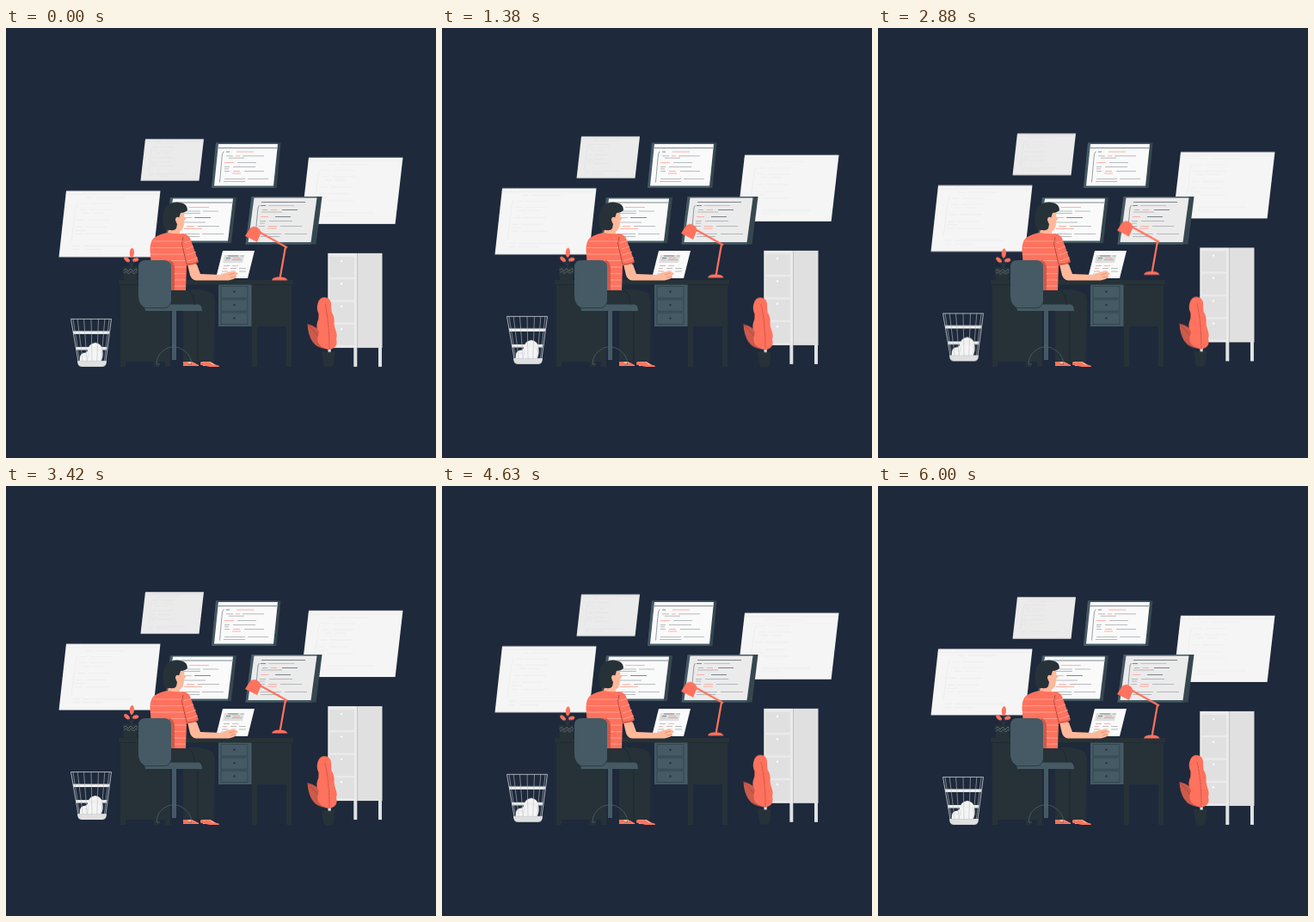
Write an HTML page that moves like this. It is 500x500 px and loops after 6.04 s.

```html
<!DOCTYPE html>
<html lang="en">
<head>
<meta charset="utf-8">
<title>Night desk</title>
<style>
  html, body { margin: 0; width: 100%; height: 100%; overflow: hidden; background: #1e293b; }
  svg { display: block; width: 100vw; height: 100vh; }
  .dark { fill: #263238; }
  .slate { fill: #455a64; }
  .red { fill: #ff725e; }
  .skin { fill: #ffb89a; }
  .pale { fill: #e0e0e0; }
  .line { fill: none; stroke-width: .7; }
</style>
</head>
<body>
<svg viewBox="0 0 500 500">
  <g class="float" id="windows"></g>
  <g id="monitors"></g>

  <g class="float" id="cabinet">
    <path fill="#dfe2e4" d="M404.300 371h4v23h-4zM433 371h4v23h-4z"/>
    <path class="pale" d="M374.500 262h63v110h-63z"/>
    <path fill="#ebebeb" d="M374.500 262h33.500v110h-33.500z"/>
    <path class="line" stroke="#b5b5b5" d="M408.500 262v110"/>
  </g>

  <g class="float" id="basket">
    <path fill="#f5f5f5" d="M86 387q-1-8 4-9q4 0 5-3q1-8 9-9q7 1 8 8q2 8-2 14h-23z"/>
    <path class="line" stroke="#dcdcdc" d="M96 376q1 5-2 11M105 371q5 2 6 8M90 381l6 1"/>
    <path fill="#f0f0f0" d="M77.800 352.500h42.500l-.6 3.500h-41.300zM81 371h36.500l-.6 3.500h-35.300z"/>
    <path class="pale" d="M83 387h34q0 7-5 7h-24q-5 0-5-7z"/>
  </g>

  <g class="sway" id="floorPlant">
    <path class="dark" d="M367 376h15.500l-1.500 15q-1 3-3 3h-6q-2 0-3-3z"/>
    <path fill="#ebebeb" d="M374.500 371h3.200v5.500h-3.200z"/>
    <path fill="#cc5b4b" d="M350.500 344q13 3 17.500 13q3 7 4 16q-11-1-16-9q-5-8-5.500-20z"/>
    <path class="line" stroke="#9f4438" d="M351 345q13 12 21 28"/>
    <path class="red" d="M370 313q7 0 8 7q0 5 .5 10q4 6 3 13q0 4 2 9q2 5 .5 9q2 8-3 11q-5 3-9 1q-8-3-9.500-9q-1-5 1.500-10q-4-6-2-12q2-4 1.500-10q-3-6-1-12q2-7 7.500-7z"/>
    <path class="line" stroke="#a8483c" stroke-dasharray="2 .7" d="M371 321q5 21 5 53"/>
  </g>

  <g class="swayBack">
    <g class="red">
      <ellipse cx="146.400" cy="261.500" rx="2.600" ry="5.600" transform="rotate(4 146 261)"/>
      <ellipse cx="140.600" cy="269.300" rx="4" ry="2.200" transform="rotate(42 140.600 269.300)"/>
      <ellipse cx="150.700" cy="269.700" rx="3.700" ry="2.200" transform="rotate(-14 150.700 269.700)"/>
    </g>
    <path class="line" stroke="#37474f" d="M146 267v11M142 272l4 5l4-6"/>
    <path class="dark" d="M135.500 277.500h18l-1.500 17h-15z"/>
    <path class="line" stroke="#78868c" d="M136.500 282l2.500-2l3 3l3-3l3 3l3-3l2 2M137 285l2.500-2l3 3l3-3l3 3l3-3l1 1.500"/>
  </g>

  <g id="desk">
    <path class="dark" d="M131 293h203v6h-203zM133 298h58v90h-58zM133 387h6v7h-6zM172 387h6v7h-6zM185 387h6v7h-6zM285 298h47v49h-47zM286 346h6v48h-6zM326 346h6v48h-6z"/>
    <path class="line" stroke="#1f2a30" d="M131 298.500h203"/>
    <path class="slate" d="M247 298.500h38.500v48.500h-38.500z"/>
  </g>

  <g id="laptop"></g>

  <g id="person">
    <path class="skin" d="M207 387h7l10 5v1h-16zM227 387h9l10 6h-17z"/>
    <path class="red" d="M206 388h5l2 3l6-2l5 4h-18zM226 388.500h11l3 3l6 .5q2 .5 2 2h-11l-11-2.500z"/>
    <path class="dark" d="M178 304h38q18 0 24 5q3 4 3 11l-1 68h-36v-60h-28z"/>
    <path class="line" stroke="#17212a" d="M223 330v57M210 304q9 4 9 18"/>
    <path class="skin" d="M192 226l10 6v9q-6 4-15 0z"/>
    <path class="skin" d="M196 209h11q0 8 .5 12l2 0-2.500 4q0 9-4 11q-6 1-9-6z"/>
    <path class="dark" d="M184 234q-3-9-1-18q1-9 8-12q8-3 15 0q5 2 5 8q-3 3-8 3l-2 6q-4-2-4 2q1 4 2 5l-1 5q-2 3-7 2q-4 0-7-1z"/>
    <ellipse class="skin" cx="199.500" cy="222.500" rx="2" ry="2.800"/>
    <path class="skin" d="M210 270l12 5l4 11l25 1q7-4 12-4q5 0 7 3l-3 2l1 2q-4 3-9 3.500h-38q-5-.5-7-6z"/>
    <path class="line" stroke="#e4896d" d="M259 287l7-2M261 290l7-1"/>
    <path class="red" d="M172 244q8-5 16-6q9 2 18 1q7 1 9 8l9 25q-5 4-14 4l-1 29h-38l-3-40q-2-16 4-21z"/>
    <path fill="#cc5b4b" d="M190 270q6 2 6 9v26h-6z"/>
    <g class="line" stroke="#ffb5a8">
      <path d="M171 248h35M169 255.500h38M168 263h39M192 270.500h17M196 278h13M196 285.500h13M196 293h13M196 300h13"/>
      <path d="M207 249.500l8-2M209 257l9-3M210 264l11-3.500M211 271l12-4"/>
    </g>
    <path class="line" stroke="#8d3f36" d="M206 243q-3 8 0 14l4 18l8-1l6-3"/>
  </g>

  <g id="chair">
    <path class="slate" d="M193 328h5v58h-5z"/>
    <path class="line" stroke="#53666f" d="M175 391q0-13 13-19q7-3 14 0q13 6 14 19M175 391h4M212 391h4"/>
    <path class="slate" d="M162 321.500h62q4 1 4 7.500h-66q-1-3 0-7.500z"/>
    <path class="slate" d="M162 270h22q8 0 8 8v40q0 7-7 8h-18q-13-1-13-15v-33q0-8 8-8z"/>
    <path class="line" stroke="#263238" d="M162 325.500h23q6-1 6.500-7M192 306q14-1 21 5q6 5 6 11"/>
  </g>

  <g class="float" id="lamp">
    <path fill="none" stroke="#ff725e" stroke-width="2.200" d="M293 236.500l34 19M325.200 253.500l-6.700 38"/>
    <path class="red" d="M278 242l5-8q3-4 8-2.500q5 2 5.500 7l-4.500 10.500z"/>
    <path class="red" d="M309 293.500q1-4 9-4q8 0 9.500 4z"/>
  </g>
</svg>

<script>
const NS = 'http://www.w3.org/2000/svg';
const LOOP = 6040, LIFT = 6.9, SWAY = 1.5;
const INK = { d: '#56636b', g: '#a2a7aa', r: '#ff9a8a' };
const $ = id => document.getElementById(id);

function add(parent, tag, attrs) {
  const node = document.createElementNS(NS, tag);
  for (const key in attrs) node.setAttribute(key, attrs[key]);
  return parent.appendChild(node);
}

// Parallelogram: top-left corner, width, height, leftward slant.
function slab(parent, x, y, w, h, slant, fill) {
  add(parent, 'path', { fill, d: `M${x} ${y}h${w}l${-slant} ${h}h${-w}z` });
}

function stroke(parent, d, color, width = .8) {
  add(parent, 'path', { d, fill: 'none', stroke: color, 'stroke-width': width });
}

// Each row is "y ink:from-to ink:from-to ...".
function code(parent, rows) {
  for (const row of rows.split('\n')) {
    const [y, ...runs] = row.trim().split(' ');
    for (const run of runs) {
      const [ink, span] = run.split(':');
      const [from, to] = span.split('-');
      stroke(parent, `M${from} ${y}H${to}`, INK[ink], .75);
    }
  }
}

function faintWindow(x, y, w, h, slant, fill, ink) {
  const g = $('windows'), k = h / 77;
  const at = dy => x - slant * dy / h;
  slab(g, x, y, w, h, slant, fill);
  stroke(g, `M${at(4 * k)} ${y + 4 * k}h${w}`, ink, .5);
  for (let i = 0; i < 3; i++)
    add(g, 'circle', { cx: x + (7 + i * 5) * k, cy: y + 2.2 * k, r: .8 * k, fill: '#fff' });
  stroke(g, `M${x + 14 * k} ${y + 14 * k}q${-3 * k} 2 ${-4 * k} ${15 * k}l${-4 * k} ${30 * k}`, ink, .5);
  const rows = [[8, 24, 70], [15, 18, 55], [22, 18, 56], [26, 22, 46], [34, 17, 55],
                [42, 16, 52], [46, 16, 24], [50, 16, 58], [64, 15, 84], [68, 15, 50]];
  for (const [dy, from, to] of rows) {
    const left = at(dy * k) + from * w / 110;
    stroke(g, `M${left} ${y + dy * k}h${8 * k}m${4 * k} 0H${left + (to - from) * w / 110}`, ink, .5);
  }
}

function monitor(x, y, w, h, slant, screen, side, rows) {
  const g = $('monitors');
  slab(g, x, y, w, h, slant, '#37474f');
  slab(g, x, y, w - side, h, slant, '#455a64');
  slab(g, x + 3, y + 1.5, w - side - 3, h - 4, slant, screen);
  stroke(g, `M${x + 9} ${y + 10}q-2 2-2 8l-2.500 28`, INK.d, .6);
  code(g, rows);
}

faintWindow(162, 129.2, 68, 48.5, 5.5, '#ebebeb', '#dedede');
faintWindow(70, 189.4, 109.5, 77.2, 8.5, '#f5f5f5', '#e6e6e6');
faintWindow(352, 150.8, 109.5, 77.2, 8.9, '#f5f5f5', '#e6e6e6');

monitor(244, 133.5, 75.5, 52.5, 5, '#fafafa', 3.5, `139.5 d:247-315
  144 d:256-260 r:268-288
  148.8 g:256-264 r:267-272 g:275-300
  151.2 g:259-277
  156.5 r:254-265 g:269-291
  161.5 g:254-260 g:264-290
  163.8 g:254-259
  166.5 g:254-260 r:264-272 g:277-300
  169 r:263-273
  175.5 g:254-278 g:281-305
  178.5 g:253-278`);

monitor(191, 197, 77, 53, 6, '#fafafa', 4, `203 d:194-263
  208.5 r:213-236
  213 g:205-226 g:229-247
  215.5 g:206-226
  220.5 r:206-216 d:219-238
  226 g:205-232
  230.5 r:210-219 g:223-248
  233.5 r:207-228
  239.5 g:205-225 g:228-253
  242.5 g:203-225`);

monitor(285.5, 196, 82, 55.5, 7, '#ebebeb', 6, `202.5 d:297-348
  206.5 d:296-302 r:305-335
  211.5 g:298-304 r:308-315 d:321-339
  214 g:297-321
  219.5 r:296-305 d:313-331
  224.5 g:295-302 g:306-333
  227 g:295-301
  230.5 g:294-301 r:305-315 g:319-344
  233 r:304-315
  239.5 g:296-320 g:324-350
  242.5 g:296-318`);

const laptop = $('laptop');
slab(laptop, 252, 259, 37, 32, 8, '#fafafa');
slab(laptop, 254, 264, 23, 9, 2, '#dedede');
code(laptop, `265 d:258-270 g:273-277
  267.5 d:256-261 r:264-272
  269.5 r:255-260 g:263-274
  276.5 g:253-260 r:263-270
  279.5 r:252-257 g:261-268 g:271-279
  283 g:251-258 r:262-267 g:271-279
  286 g:250-265
  288.5 g:250-258`);

const desk = $('desk'), cabinet = $('cabinet');
for (let i = 0; i < 3; i++) {
  const y = 300.5 + i * 15.3;
  stroke(desk, `M250 ${y}h31v13.500h-31z`, '#2f424b', .8);
  add(desk, 'circle', { cx: 265.5, cy: y + 6.3, r: 1.2, fill: '#263238' });
}
for (let i = 0; i < 4; i++) {
  const y = 266 + i * 26.4;
  add(cabinet, 'rect', { x: 376.5, y, width: 28.5, height: 24, fill: '#e0e0e0' });
  add(cabinet, 'circle', { cx: 390, cy: y + 5, r: 1.2, fill: '#fff' });
}

// Wires crowd towards the rim's ends, as on a round basket.
const basket = $('basket');
stroke(basket, 'M75.500 338.500h47l-6.500 49h-32z', '#cfd3d7', .8);
for (let i = -3; i <= 3; i++) {
  const side = Math.sin(i * .37);
  stroke(basket, `M${99 + 23.5 * side} 338.500L${100 + 16 * side} 387.500`, '#b9bfc5', .6);
}

const shift = y => ({ transform: `translateY(${y}px)` });
const wave = sign => Array.from({ length: 25 }, (_, i) =>
  shift(sign * SWAY * Math.sin(i / 24 * 2 * Math.PI)));

function loop(selector, frames, duration) {
  for (const node of document.querySelectorAll(selector))
    node.animate(frames, { duration, iterations: Infinity }).startTime = 0;
}

loop('.float', [shift(0), shift(-LIFT), shift(0)], LOOP);
loop('.sway', wave(1), LOOP / 2);
loop('.swayBack', wave(-1), LOOP / 2);
</script>
</body>
</html>
```
